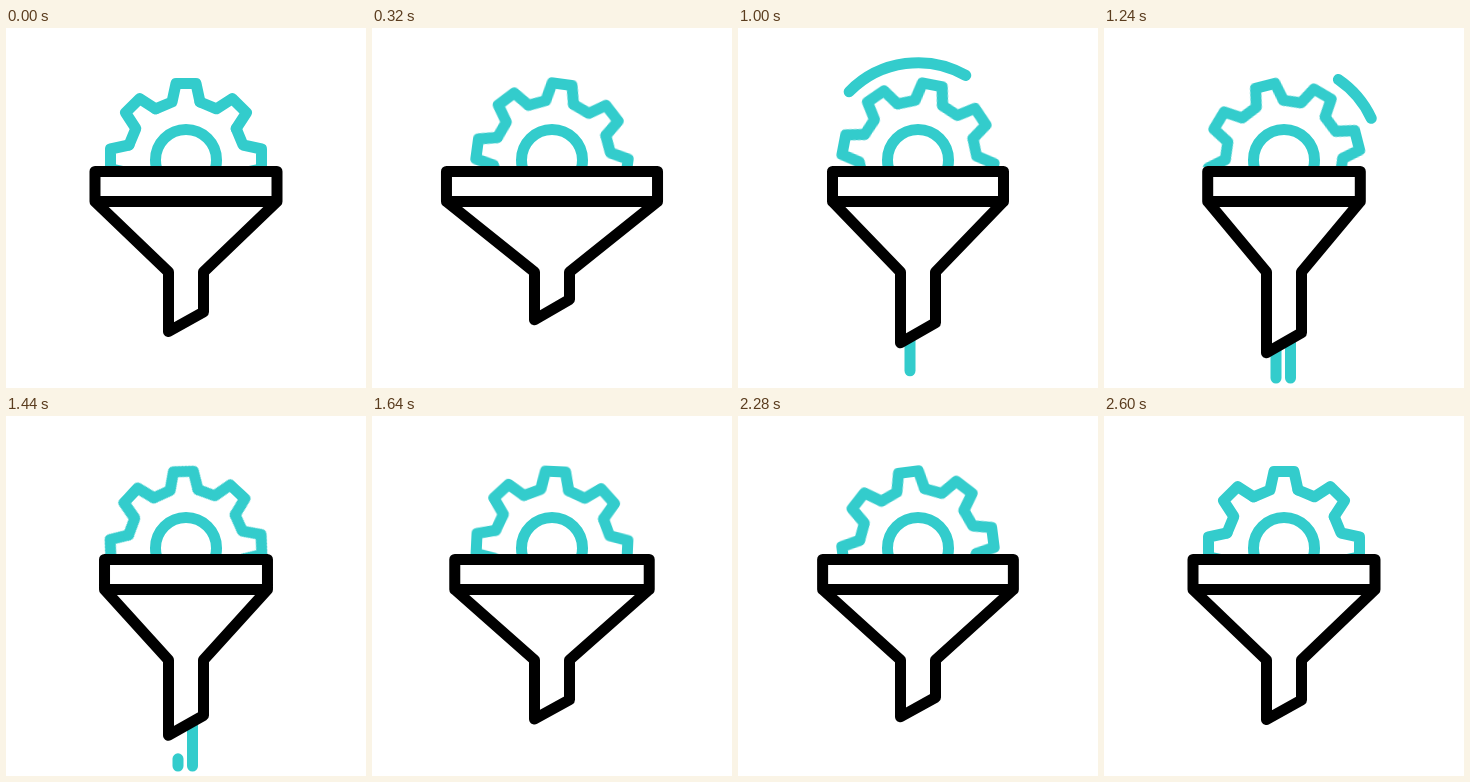
Write an HTML page that moves like this. It is 360 px wide and 360 px high and loops after 2840 ms.

```html
<!DOCTYPE html>
<html lang="en">
<head>
<meta charset="utf-8">
<title>Funnel and gear</title>
<style>
  @property --head { syntax: "<number>"; inherits: false; initial-value: 0; }
  @property --tail { syntax: "<number>"; inherits: false; initial-value: 0; }

  :root { --loop: 2840ms; }
  html, body { margin: 0; width: 100%; height: 100%; overflow: hidden; background: #fff; }
  svg { display: block; width: 100vw; height: 100vh; }

  path, circle { fill: none; stroke: #33cccc; stroke-width: 11; stroke-linecap: round; stroke-linejoin: round; }

  .gear { animation: spin var(--loop) infinite; }
  @keyframes spin {
    0% { transform: rotate(0deg); animation-timing-function: cubic-bezier(.52, 0, .47, 1); }
    91.549%, 100% { transform: rotate(360deg); }
  }

  /* four equal swings of 650 ms, then a rest */
  .funnel { fill: #fff; stroke: #000; animation: squash var(--loop) cubic-bezier(.3, 0, .4, 1) infinite; }
  @keyframes squash {
    0%, 91.549%, 100% {
      d: path("M89 143.5L271 143.5L271 173.5L197.5 244L197.5 284L162.5 303.5L162.5 244L89 173.5ZM89 173.5L271 173.5");
    }
    22.887% {
      d: path("M67.5 143.5L292.5 143.5L292.5 173.5L197.5 244L197.5 265.5L162.5 286L162.5 244L67.5 173.5ZM67.5 173.5L292.5 173.5");
    }
    45.775% {
      d: path("M104 143.5L256 143.5L256 173.5L197.5 244L197.5 305L162.5 325L162.5 244L104 173.5ZM104 173.5L256 173.5");
    }
    68.662% {
      d: path("M74.5 143.5L285.5 143.5L285.5 173.5L197.5 244L197.5 275.5L162.5 294.5L162.5 244L74.5 173.5ZM74.5 173.5L285.5 173.5");
    }
  }

  /* strokes drawn on by the head, wiped off by the tail */
  .trim {
    visibility: hidden;
    stroke-dasharray: calc((var(--head) - var(--tail)) * 1px) 300px;
    stroke-dashoffset: calc(var(--tail) * -1px);
    animation-duration: var(--loop);
    animation-timing-function: cubic-bezier(.25, 0, .75, 1);
    animation-iteration-count: infinite;
  }
  .swoosh { animation-name: sweep-show, sweep-head, sweep-tail; animation-delay: 610ms, 610ms, 835ms; }
  .drip { animation-name: drip-show, drip-head, drip-tail; animation-delay: 770ms, 770ms, 1210ms; }
  .late { animation-delay: 915ms, 915ms, 1355ms; }

  @keyframes sweep-show { 0%, 27.6% { visibility: visible; } 27.61%, 100% { visibility: hidden; } }
  @keyframes sweep-head { 0% { --head: 0; } 19.72%, 100% { --head: 100; } }
  @keyframes sweep-tail { 0% { --tail: 0; } 19.72%, 100% { --tail: 100; } }
  @keyframes drip-show { 0%, 25.3% { visibility: visible; } 25.31%, 100% { visibility: hidden; } }
  @keyframes drip-head { 0% { --head: 0; } 9.86%, 100% { --head: 100; } }
  @keyframes drip-tail { 0% { --tail: 0; } 9.86%, 100% { --tail: 100; } }
</style>
</head>
<body>
<svg viewBox="0 0 360 360">
  <defs>
    <clipPath id="above"><rect width="360" height="138.5"/></clipPath>
    <path id="tooth" d="M-30.4-50.2L-14-57L-10-75.5L10-75.5L14-57"/>
  </defs>

  <g clip-path="url(#above)">
    <g transform="translate(180 131)">
      <circle r="30.5" cy="1"/>
      <g class="gear">
        <use href="#tooth"/>
        <use href="#tooth" transform="rotate(45)"/>
        <use href="#tooth" transform="rotate(90)"/>
        <use href="#tooth" transform="rotate(135)"/>
        <use href="#tooth" transform="rotate(180)"/>
        <use href="#tooth" transform="rotate(225)"/>
        <use href="#tooth" transform="rotate(270)"/>
        <use href="#tooth" transform="rotate(315)"/>
      </g>
    </g>
  </g>

  <path class="trim swoosh" pathLength="100" d="M85.2 114.3A96.3 96.3 0 0 1 267.3 90.3"/>
  <path class="trim drip" pathLength="100" d="M172 280V350"/>
  <path class="trim drip late" pathLength="100" d="M186.5 280V350"/>

  <path class="funnel" d="M89 143.5L271 143.5L271 173.5L197.5 244L197.5 284L162.5 303.5L162.5 244L89 173.5ZM89 173.5L271 173.5"/>
</svg>
</body>
</html>
```
